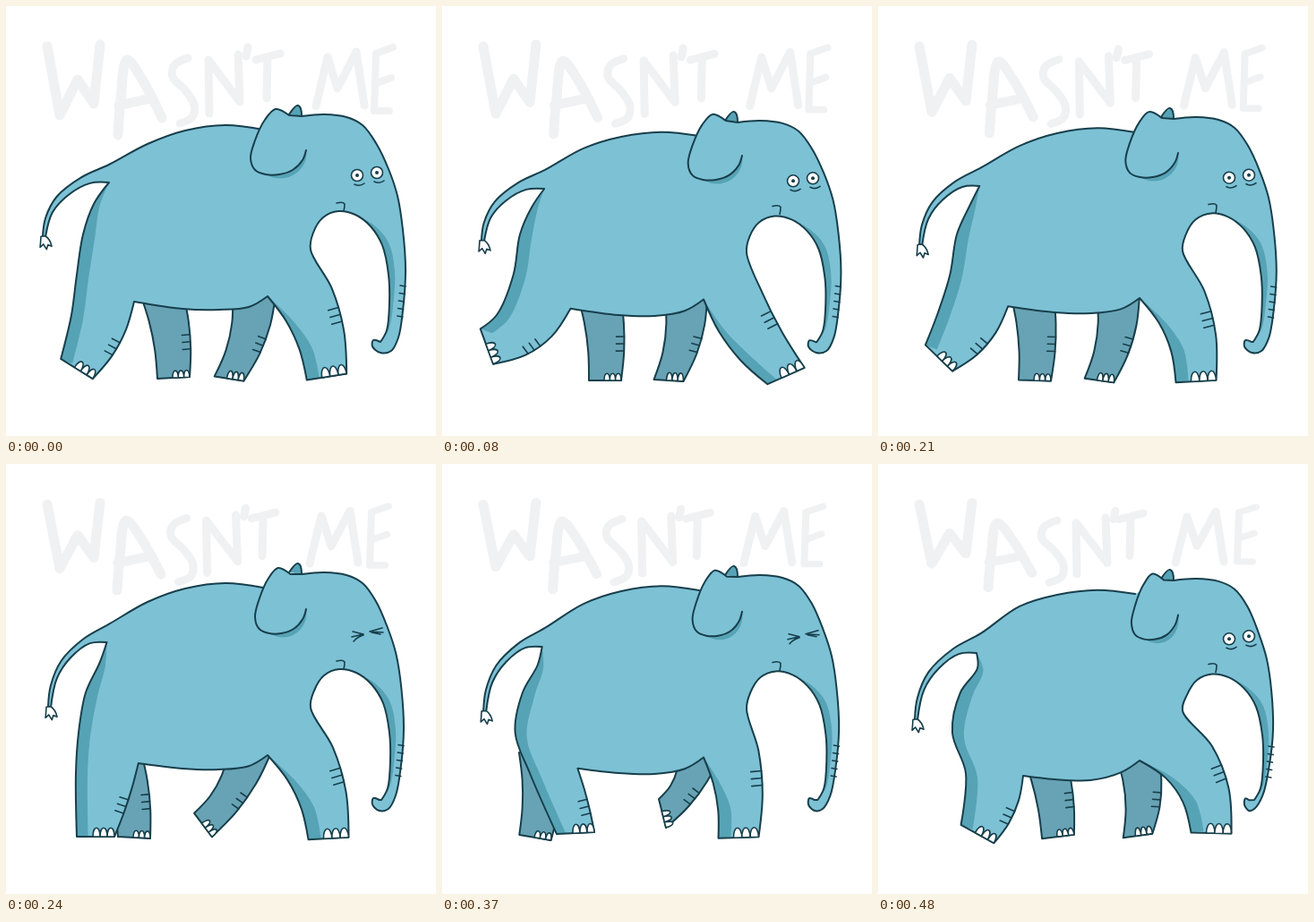
Write an HTML page that moves like this. It is 480x480 px and loops after 560 ms.

```html
<!DOCTYPE html>
<html lang="en">
<head>
<meta charset="utf-8">
<title>Wasn't me</title>
<style>
  html, body { margin: 0; width: 100%; height: 100%; overflow: hidden; background: #fff; }
  svg { display: block; width: 100vw; height: 100vh; }
  path, circle { fill: none; stroke-linecap: round; stroke-linejoin: round; }
  .line { stroke: #173f4b; stroke-width: 2; }
  .thin { stroke: #173f4b; stroke-width: 1.6; }
  .skin { fill: #7dc1d5; }
  .far { fill: #68a3b5; }
  .shade { fill: #57a3b6; }
  .white { fill: #fff; }
  .ink { fill: #173f4b; }
  .letter { stroke: #f0f1f3; }
</style>
</head>
<body>
<svg id="stage" viewBox="0 0 480 480" role="img" aria-label="Wasn't me"></svg>
<script>
const STEP = 80, POSES = 7;

// How far the head and the hindquarters sink in each pose.
const headDip = [0, 7, 3, 0, 3, 8, 7];
const rumpDip = [0, 7, 4, 2, 7, 12, 14];
const isShut = i => i === 3 || i === 4;

// Walk keys: middle of the sole x, y and its tilt in degrees, then one value per leg.
const walk = {
  // knee bend
  nearFront: [[358, 414, -9, 11], [384, 413, -24, -6], [355, 419, -3, 13], [360, 418, -3, 12],
    [331, 417, -2, 9], [329, 411, 23, 17], [372, 412, 1, 17]],
  // x of the hock
  nearHind: [[79, 405, 32, 73], [50, 380, 70, 61], [68, 393, 44, 66], [100, 416, 0, 78],
    [149, 412, -3, 98], [128, 418, 9, 100], [111, 413, 29, 98]],
  // x of the hip
  farFront: [[249, 416, 9, 277], [253, 418, 3, 272], [247, 418, 8, 268], [220, 403, 53, 272],
    [246, 390, 76, 288], [269, 411, 47, 302], [290, 415, -8, 288]],
  farHind: [[187, 415, -3, 174], [182, 418, 0, 175], [175, 418, 2, 172], [143, 417, 3, 127],
    [104, 417, 10, 110], [193, 416, -6, 180], [201, 416, -7, 184]]
};

const headShape = '330 123 355 121 380 124 398 133 413 153 427 182 437 212 443 250 446 295 443 340 438 370 430 385 418 387 409 380 410 373 418 375';
const throatShape = '418 375 425 362 428 330 427 300 420 267 407 246 390 233 371 229 354 236 343 253';
const earShape = '316 122 301 115 289 127 278 150 273 170 278 183 290 188 305 188 320 183 331 172 335 161';

// Lettering: width, sideways drift, drop and shrink over the loop, top, strokes.
const letters = [
  [11, 0, 0, .13, 42, '46 45 60 122', '60 122 80 82', '80 82 98 109', '98 109 105 43'],
  [11, -2, 6, .13, 55, '125 144 128 105 135 60 152 82 174 125', '126 111 162 103'],
  [9, -3, 5, .05, 58, '203 58 188 66 186 79 200 94 210 110 208 124 194 131'],
  [9, -5, 6, .04, 50, '227 120 226 60', '226 60 261 107', '261 107 259 54', '270 46 268 56'],
  [9, -10, 2, .05, 53, '279 60 306 53', '292 58 291 103'],
  [9, -14, 2, .06, 52, '346 112 359 57', '359 57 370 92', '370 92 391 51', '391 51 400 111'],
  [8, -10, 2, .14, 46, '413 53 411 117', '413 53 432 46', '412 87 430 80', '411 117 428 117']
];

const clamp = v => Math.max(0, Math.min(1, v));
const mix = (a, b, [u, v]) => [a[0] + (b[0] - a[0]) * u, a[1] + (b[1] - a[1]) * v];
const points = s => {
  const n = s.split(' ').map(Number), list = [];
  for (let i = 0; i < n.length; i += 2) list.push([n[i], n[i + 1]]);
  return list;
};
const fmt = p => p.map(v => v.toFixed(1)).join(' ');
const path = (cls, d, extra = '') => `<path class="${cls}" d="${d}" ${extra}/>`;

// Centripetal spline through the points, without the opening move.
function spline(p) {
  const gap = (a, b) => Math.sqrt(Math.hypot(a[0] - b[0], a[1] - b[1]));
  const handle = (before, at, after) => {
    const a = before ? gap(before, at) : 0, b = gap(at, after);
    if (a < 1e-6 || b < 1e-6) return at;
    return at.map((v, k) =>
      (a * a * after[k] - b * b * before[k] + (2 * a * a + 3 * a * b + b * b) * v) / (3 * a * (a + b)));
  };
  let d = '';
  for (let i = 0; i < p.length - 1; i++) {
    const c1 = handle(p[i - 1], p[i], p[i + 1]);
    const c2 = handle(p[i + 2], p[i + 1], p[i]);
    d += `C${fmt(c1)} ${fmt(c2)} ${fmt(p[i + 1])}`;
  }
  return d;
}
const chain = lists => lists.map((p, i) => (i ? 'L' : 'M') + fmt(p[0]) + spline(p)).join('');

// Leg edge: a bowed line, bulging forward by bend at its middle.
function edge(top, end, bend) {
  const dx = end[0] - top[0], dy = end[1] - top[1], len = Math.hypot(dx, dy);
  const at = t => {
    const bow = 4 * t * (1 - t) * bend / len;
    return [top[0] + dx * t + dy * bow, top[1] + dy * t - dx * bow];
  };
  return { at, len, inward: [-dy / len, dx / len], list: [0, .33, .67, 1].map(at) };
}

function sole([x, y, tilt], length) {
  const a = tilt * Math.PI / 180, dx = Math.cos(a) * length / 2, dy = Math.sin(a) * length / 2;
  return { heel: [x - dx, y - dy], toe: [x + dx, y + dy] };
}

// Three toenails at the front of the sole.
function nails({ heel, toe }, length, height) {
  const span = Math.hypot(toe[0] - heel[0], toe[1] - heel[1]);
  const ux = (toe[0] - heel[0]) / span, uy = (toe[1] - heel[1]) / span;
  const w = length / 3, nx = uy * height * 1.3, ny = -ux * height * 1.3;
  let d = `M${fmt([toe[0] - ux * length, toe[1] - uy * length])}`;
  for (let i = 0; i < 3; i++) d += `c${fmt([nx, ny, ux * w + nx, uy * w + ny, ux * w, uy * w])}`;
  return path('white thin', d + 'Z');
}

// Three wrinkles running inward from the middle of an edge.
function wrinkles({ at, len, inward }, size) {
  let d = '';
  for (let i = 0; i < 3; i++) d += `M${fmt(at(.49 + i * 8 / len))}l${fmt(inward.map(v => v * size))}`;
  return path('thin', d);
}

// Shadow beside an edge, narrowing where taper(k) falls to zero.
function band(line, dx, dy, taper) {
  const inner = line.map((p, k) => [p[0] + dx * taper(k), p[1] + dy * taper(k)]).reverse();
  return path('shade', chain([line, inner]) + 'Z');
}

function farLeg(key, length, bend, nailHeight) {
  const foot = sole(key, length), hip = key[3], y = 322;
  const back = edge([hip - 24, y], foot.heel, bend);
  const front = edge([hip + 24, y], foot.toe, bend);
  return path('far line', chain([back.list, [...front.list].reverse()])) +
    nails(foot, 19, nailHeight) + wrinkles(front, 9);
}

function eyes(y, shut) {
  if (shut) {
    return path('thin', `M387 ${y - 4}l12 3M386 ${y + 2}l13 -3M388 ${y + 7}q4 -5 11 -7` +
      `M420 ${y - 8}l-14 4M421 ${y - 3}l-15 -1M418 ${y - 1}l-10 -2`);
  }
  const eye = (x, cy) => `<circle class="white thin" cx="${x}" cy="${cy}" r="6.5"/>` +
    `<circle class="ink" cx="${x}" cy="${cy}" r="2"/>` +
    path('thin', `M${x - 3} ${cy + 10}q6 3 11 -1`);
  return eye(392, y) + eye(414, y - 3);
}

function lettering(p) {
  return letters.map(([width, drift, drop, shrink, top, ...strokes]) => {
    const scale = 1 - shrink * p, dy = drop * p + top * (1 - scale);
    return path('letter', strokes.map(s => chain([points(s)])).join(''),
      `stroke-width="${width}" transform="translate(${drift * p} ${dy}) scale(1 ${scale})"`);
  }).join('');
}

function draw(i) {
  const p = i / (POSES - 1), dip = headDip[i], sag = rumpDip[i];

  const head = points(headShape).map(([x, y]) => {
    const low = clamp((y - 121) / 265);
    return [x - 3 * p * clamp((x - 410) / 20) - 7 * p * p * low ** 3 * clamp((x - 410) / 20),
      y + dip * (1 - low)];
  });
  const throat = points(throatShape).map(([x, y]) =>
    [x + 2 * p, y + dip * .8 * (1 - clamp((y - 229) / 130))]);
  const ear = points(earShape).map(([x, y]) =>
    [335 - (335 - x) * (1 - .16 * p), y + dip * .8 + 2 * p]);

  const frontFoot = sole(walk.nearFront[i], 45), knee = walk.nearFront[i][3];
  const groin = [292, 324 + sag / 2];
  const frontLeg = edge([340, 272 + dip / 2], frontFoot.toe, knee + 1);
  const heel = [...edge(groin, frontFoot.heel, knee - 3).list].reverse();

  const flank = [143 + 19 * p * p, 330 + sag + 4 * p];
  const belly = [groin, [271, 336 + sag * .6], [237, 339 + sag], [197, 338 + sag], flank];

  const hindFoot = sole(walk.nearHind[i], 42), [, , hindTilt, hock] = walk.nearHind[i];
  const hindLeg = edge(flank, hindFoot.toe, hindTilt * .18 + 2);
  const root = [115 - 5 * p, 197 + sag];
  const rump = [hindFoot.heel, [hock, 345], [79 + 4 * p, 300], [86 + 6 * p, 255],
    [98 + 13 * p, 221 + sag / 2], root];

  const tip = [41 + 6 * Math.sin(Math.PI * p), 257 + 28 * p];
  const tipIn = [tip[0] + 3, tip[1] + 1], dock = [115, 177 + sag * .85];
  const tail = [root, ...[[.3, .015], [.64, .23], [.89, .55]].map(f => mix(root, tipIn, f)), tipIn];
  const back = [tip, ...[[.04, .25], [.21, .55], [.58, .82]].map(f => mix(tip, dock, f)), dock,
    [158, 154 + dip * .7], [200, 139 + dip], [245, 133 + dip * 1.1], [287, 138 + dip]];

  const body = chain([[ear[0]], head, [...throat, ...frontLeg.list], heel, belly,
    hindLeg.list, rump, tail, back]);
  const fade = line => k => Math.min(1, (line.length - 1 - k) / 2);
  const rim = ear.slice(-5), [ex, ey] = rim[0], [tx, ty] = rim[4], [hx, hy] = head[0];
  const trunk = throat.slice(0, 7);
  let rings = '';
  for (let k = 0; k < 5; k++) rings += `M${446 - 4 * p - k * .8} ${313 + 3 * p + k * 8.5}l-6 -1`;

  return lettering(p) +
    farLeg(walk.farHind[i], 36, 4, 8) +
    farLeg(walk.farFront[i], 33, 7, 9) +
    path('shade line', `M${hx - 14} ${hy - 2}q7 -11 10 -10q4 1 4 12`) +
    path('skin', body) +
    `<clipPath id="body${i}"><path d="${body}"/></clipPath><g clip-path="url(#body${i})">` +
    band(rump, 13, 5, fade(rump)) +
    band(heel, 14, -2, fade(heel)) +
    band(trunk, 7, -3, k => Math.min(1, k / 3, (6 - k) / 2)) +
    '</g>' +
    path('line', body) +
    path('shade', chain([rim]) + `C${tx + 4} ${ty + 20} ${ex + 24} ${ey + 14} ${ex} ${ey}Z`) +
    path('skin', chain([ear]) + 'Z') +
    path('line', chain([ear])) +
    nails(frontFoot, 28, 11) + wrinkles(frontLeg, 12) +
    nails(hindFoot, 24, 10) + wrinkles(hindLeg, 10) +
    path('thin', rings) +
    eyes((isShut(i) ? 191 : 189) + dip * .9, isShut(i)) +
    path('thin', `M369 ${220 + dip / 2}q7 -2 9 1q0 4 -1 8`) +
    path('white thin', 'M-2 0Q-3 7 -4 12L0 9L3 15L5 10L9 12Q8 4 3 0Z',
      `transform="translate(${fmt(tip)}) rotate(-5)"`);
}

const stage = document.getElementById('stage');
stage.innerHTML = Array.from({ length: POSES }, (_, i) => `<g>${draw(i)}</g>`).join('');

const loop = STEP * POSES;
[...stage.children].forEach((group, i) => group.animate([
  { opacity: 1, easing: 'step-end' },
  { opacity: 0, offset: 1 / POSES, easing: 'step-end' },
  { opacity: 0 }
], { duration: loop, delay: i * STEP - loop, iterations: Infinity }));
</script>
</body>
</html>
```
